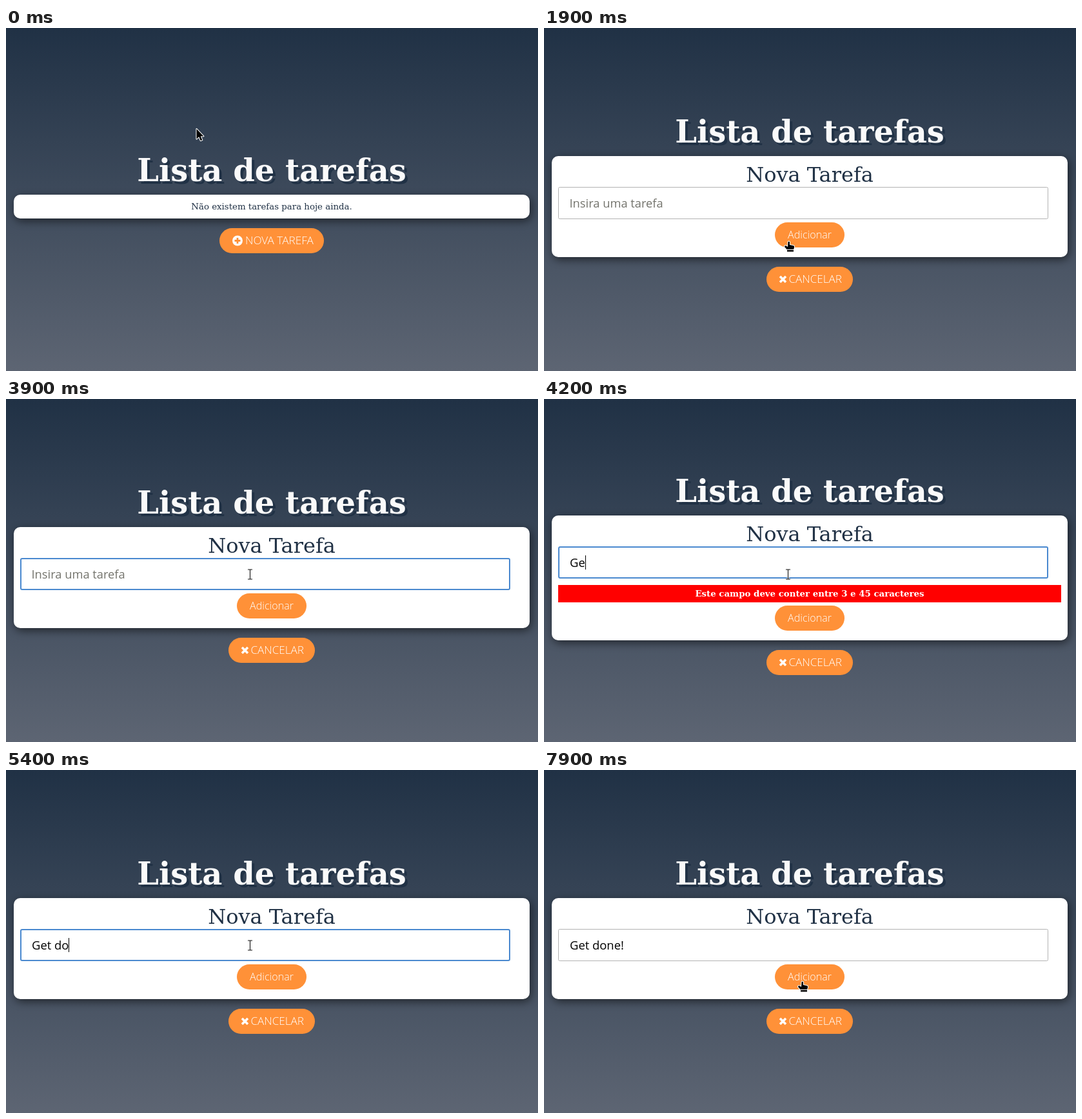
Write an HTML page with a canvas that moves like this. It is 825 px wide and 533 px high and loops after 8 s.

```html
<!DOCTYPE html>
<html lang="pt">
<head>
<meta charset="utf-8">
<title>Lista de tarefas</title>
<style>
  html, body { margin: 0; width: 100%; height: 100%; overflow: hidden; }
  canvas { display: block; }
</style>
</head>
<body>
<canvas id="stage" width="825" height="533"></canvas>
<script>
const ctx = document.getElementById('stage').getContext('2d');
const LOOP = 8000;
const CENTER = 412;
const NAVY = '#203145';
const ORANGE = '#ff9138';
const SERIF = '"DejaVu Serif", serif';
const SANS = '"Open Sans", "Noto Sans", sans-serif';

// Each list holds [start time, ...values]; a value stays until the next entry.
const POINTER = [
  [0, 'arrow', 295, 156], [400, 'arrow', 308, 171],
  [600, 'arrow', 318, 190], [700, 'arrow', 331, 218], [800, 'arrow', 345, 250],
  [900, 'arrow', 358, 281], [1000, 'arrow', 368, 304], [1100, 'hand', 377, 324],
  [1200, 'hand', 382, 334], [1400, 'hand', 379, 331],
  [2100, 'hand', 382, 332], [2200, 'hand', 378, 322], [2300, 'hand', 373, 306],
  [2400, 'beam', 376, 284], [2500, 'beam', 378, 272],
  [7100, 'beam', 380, 290], [7200, 'beam', 382, 313],
  [7400, 'hand', 402, 326], [7600, 'hand', 402, 329], [7700, 'hand', 400, 328]
];
const TYPING = [
  [0, ''], [4000, 'G'], [4200, 'Ge'], [4400, 'Get'], [4700, 'Get '],
  [5400, 'Get do'], [5600, 'Get don'], [5700, 'Get done'], [6200, 'Get done!']
];
const CARET = [[0, false], [3000, true], [3900, false], [4000, true],
  [6100, false], [6200, true], [7700, false]];

const at = (list, t) => list.findLast(entry => entry[0] <= t).slice(1);

function text(str, x, y, font, color, align = 'center') {
  ctx.font = font;
  ctx.fillStyle = color;
  ctx.textAlign = align;
  ctx.fillText(str, x, y);
}

function box(x, y, w, h, r, color) {
  ctx.beginPath();
  ctx.roundRect(x, y, w, h, r);
  ctx.fillStyle = color;
  ctx.fill();
}

function withShadow(dx, dy, blur, color, draw) {
  ctx.save();
  ctx.shadowOffsetX = dx;
  ctx.shadowOffsetY = dy;
  ctx.shadowBlur = blur;
  ctx.shadowColor = color;
  draw();
  ctx.restore();
}

function line(color, width, ...points) {
  ctx.beginPath();
  for (let i = 0; i < points.length; i += 4) {
    ctx.moveTo(points[i], points[i + 1]);
    ctx.lineTo(points[i + 2], points[i + 3]);
  }
  ctx.strokeStyle = color;
  ctx.lineWidth = width;
  ctx.stroke();
}

function background() {
  const fade = ctx.createLinearGradient(0, 0, 0, 533);
  fade.addColorStop(0, NAVY);
  fade.addColorStop(1, '#5d6573');
  ctx.fillStyle = fade;
  ctx.fillRect(0, 0, 825, 533);
}

function titleAndCard(top, height) {
  withShadow(4, 4, 0, NAVY, () =>
    text('Lista de tarefas', CENTER, top - 21, `bold 48px ${SERIF}`, '#fafafa'));
  withShadow(2, 4, 14, 'rgba(0,0,0,.55)', () => box(12, top, 800, height, 10, '#fff'));
}

const pill = (width, top) => box(CENTER - width / 2, top, width, 39, 19.5, ORANGE);

function newTaskButton(top) {
  pill(162, top);
  box(351, top + 11.5, 16, 16, 8, '#fff');
  const y = top + 19.5;
  line(ORANGE, 2.8, 354.5, y, 363.5, y, 359, y - 4.5, 359, y + 4.5);
  text('NOVA TAREFA', 371, top + 25, `300 17.2px ${SANS}`, '#fff', 'left');
}

function cancelButton(top) {
  pill(134, top);
  const y = top + 19.5;
  line('#fff', 3.6, 366, y - 4.5, 375, y + 4.5, 375, y - 4.5, 366, y + 4.5);
  text('CANCELAR', 379.5, top + 25, `300 17.1px ${SANS}`, '#fff', 'left');
}

function inputField(top, value, focused, caretOn) {
  const inset = focused ? 1 : 0.5;
  ctx.beginPath();
  ctx.roundRect(22 + inset, top + inset, 760 - 2 * inset, 50 - 2 * inset, 2);
  ctx.strokeStyle = focused ? '#4a89cf' : '#b3b3b3';
  ctx.lineWidth = 2 * inset;
  ctx.stroke();
  if (value) text(value, 40, top + 32, `500 18.4px ${SANS}`, '#000', 'left');
  else text('Insira uma tarefa', 39.5, top + 32, `18.3px ${SANS}`, '#73736c', 'left');
  if (caretOn) {
    const x = value ? 40 + Math.round(ctx.measureText(value).width) : 40;
    ctx.fillStyle = '#000';
    ctx.fillRect(x, top + 14, 1, 22);
  }
}

function form(t) {
  const [value] = at(TYPING, t);
  const tooShort = value.length > 0 && value.length < 3;
  const top = tooShort ? 181 : 199;
  const buttonTop = tooShort ? 321 : 302;
  titleAndCard(top, tooShort ? 194 : 157);
  text('Nova Tarefa', CENTER, top + 40, `32px ${SERIF}`, NAVY);
  inputField(top + 48, value, t >= 3000 && t < 7900, at(CARET, t)[0]);
  if (tooShort) {
    box(22, 289, 780, 27, 0, '#f00');
    text('Este campo deve conter entre 3 e 45 caracteres', CENTER, 307,
      `bold 13.333px ${SERIF}`, '#fff');
  }
  pill(108, buttonTop);
  text('Adicionar', CENTER, buttonTop + 25, `300 16.1px ${SANS}`, '#fff');
  cancelButton(buttonTop + 69);
}

function emptyList() {
  titleAndCard(259, 37);
  text('Não existem tarefas para hoje ainda.', CENTER, 282, `13.333px ${SERIF}`, NAVY);
  newTaskButton(311);
}

const SHAPES = {
  arrow: new Path2D('M.5 .8V16.5L4.2 13L6.8 19L9.3 18L6.8 12.2H11.4Z'),
  hand: new Path2D('M-.5 1.5Q.5 0 2 1.5V6L8 7.2Q9.5 8 9 10L8 13V16.5H-2V13.5' +
    'L-6 9Q-6 6.8-4 7.2L-1 9Z')
};

function pointer(kind, x, y) {
  ctx.save();
  ctx.translate(x, y);
  if (kind === 'beam') {
    const stem = [0.5, -7, 0.5, 8, -3, -7, 4, -7, -3, 8, 4, 8];
    line('rgba(255,255,255,.9)', 2.6, ...stem);
    line('#111', 1.1, ...stem);
  } else {
    ctx.lineJoin = 'round';
    ctx.strokeStyle = '#fff';
    ctx.lineWidth = 2;
    ctx.stroke(SHAPES[kind]);
    ctx.fillStyle = '#000';
    ctx.fill(SHAPES[kind]);
    if (kind === 'hand') line('#fff', 1, -2, 13.5, 8, 13.5);
  }
  ctx.restore();
}

function render(now) {
  const t = now % LOOP;
  background();
  if (t < 1900) emptyList();
  else form(t);
  pointer(...at(POINTER, t));
  requestAnimationFrame(render);
}
requestAnimationFrame(render);
</script>
</body>
</html>
```
